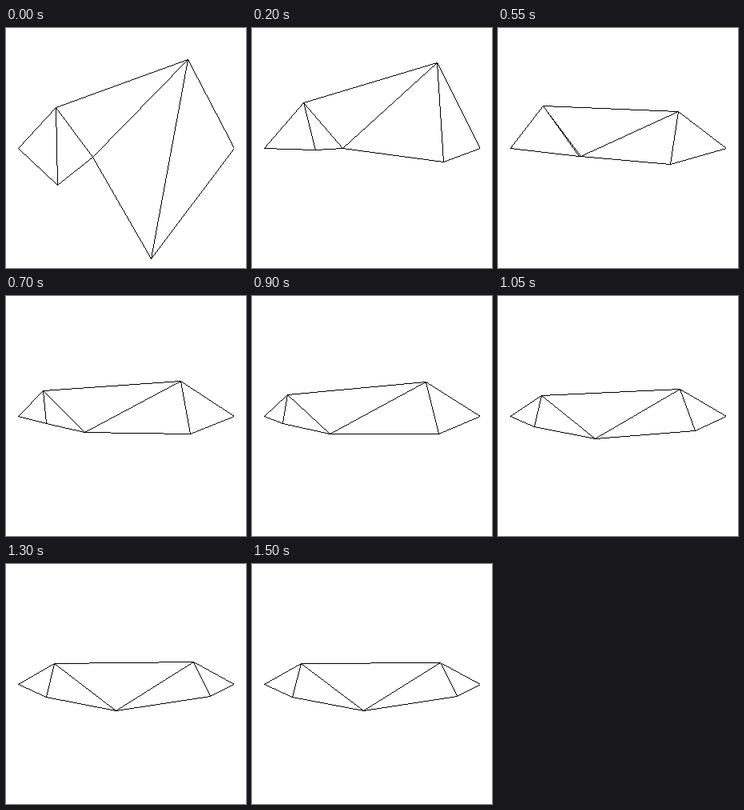
Recreate the animation shown at these times as an HTML page with a canvas. Size 300x300 px, loop 1.6 s.

```html
<!DOCTYPE html>
<html lang="en">
<head>
<meta charset="utf-8">
<title>Truss</title>
<style>
  html, body { margin: 0; width: 100%; height: 100%; overflow: hidden; background: #fff; }
  canvas { display: block; width: 300px; height: 300px; image-rendering: pixelated; }
</style>
</head>
<body>
<canvas id="stage" width="300" height="300"></canvas>
<script>
const ctx = document.getElementById('stage').getContext('2d');
const LOOP = 1600, STEP = 50, SETTLED = 1500;
const LEFT = [15, 150], RIGHT = [285, 150];

// Turning points of the free joints: top left, bottom left, middle, top right, bottom right
const poses = [
  { time: 0,       joints: [[62, 99],  [64, 196],  [108, 161], [227, 39],  [181, 288]] },
  { time: 200,     joints: [[64, 93],  [79, 152],  [113, 150], [231, 43],  [239, 167]] },
  { time: 350,     joints: [[114, 79], [69, 194],  [125, 163], [230, 94],  [220, 166]] },
  { time: 550,     joints: [[56, 97],  [101, 160], [103, 160], [225, 104], [215, 170]] },
  { time: 900,     joints: [[44, 123], [38, 159],  [97, 172],  [217, 107], [233, 172]] },
  { time: SETTLED, joints: [[61, 124], [50, 166],  [139, 183], [235, 123], [256, 165]] }
];

const easeOut = k => 1 - (1 - k) ** 3;
const mix = (a, b, k) => Math.round(a + (b - a) * k);

function jointsAt(time) {
  const next = Math.max(1, poses.findIndex(pose => pose.time >= time));
  const from = poses[next - 1], to = poses[next];
  const k = easeOut((time - from.time) / (to.time - from.time));
  const free = from.joints.map(([x, y], j) =>
    [mix(x, to.joints[j][0], k), mix(y, to.joints[j][1], k)]);
  return [LEFT, ...free, RIGHT];
}

// One-pixel line without antialiasing; the end pixel stays open
function drawLine([x1, y1], [x2, y2]) {
  const dx = x2 - x1, dy = y2 - y1;
  const length = Math.max(Math.abs(dx), Math.abs(dy));
  const advance = (d, i) => Math.sign(d) * Math.round(Math.abs(d) * i / length);
  for (let i = 0; i < length; i++) {
    ctx.fillRect(x1 + advance(dx, i), y1 + advance(dy, i), 1, 1);
  }
}

// Every joint connects to the next two; the middle ones also form the top and bottom chords
function drawTruss(joints) {
  const last = joints.length - 1;
  for (let i = 0; i < last; i++) {
    if (i !== 4 - 2) drawLine(joints[i], joints[i + 1]);
    else drawLine(joints[2], joints[3]);
    if (i + 2 <= last && i !== 2) drawLine(joints[i], joints[i + 2]);
  }
  drawLine(joints[1], joints[4]);
}

function render() {
  const elapsed = performance.now() % LOOP;
  const time = Math.min(Math.floor(elapsed / STEP) * STEP, SETTLED);
  ctx.fillStyle = '#fff';
  ctx.fillRect(0, 0, 300, 300);
  ctx.fillStyle = '#000';
  drawTruss(jointsAt(time));
  requestAnimationFrame(render);
}
render();
</script>
</body>
</html>
```
